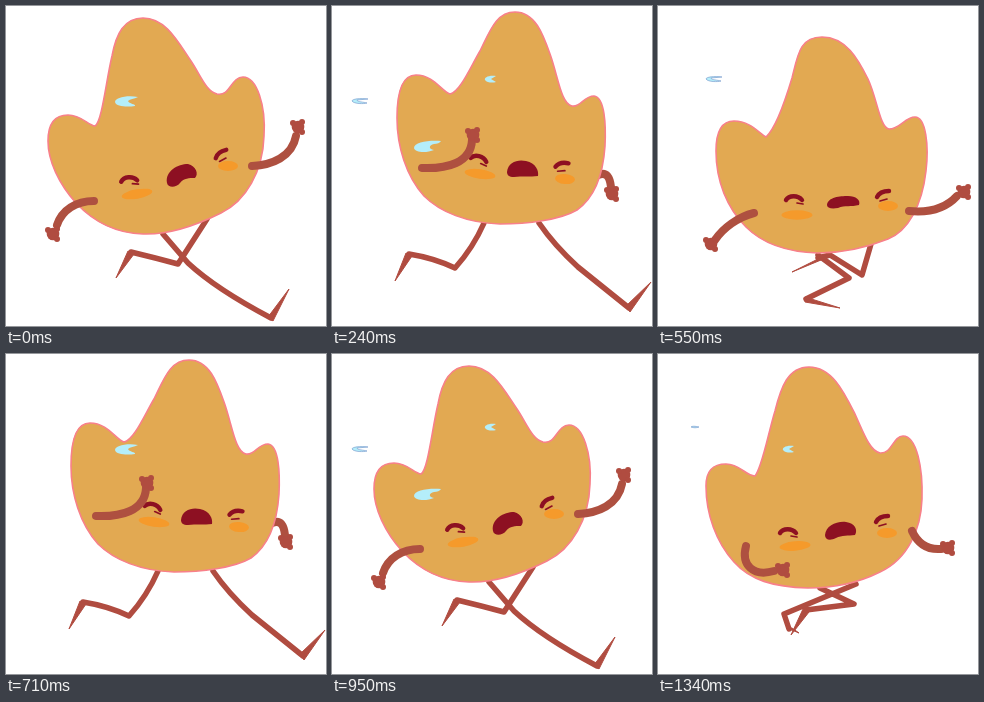
Animation of 320 by 320 pixels, one loop 1420 ms. Source, as an HTML page without scripts:

```html
<!DOCTYPE html>
<html lang="en">
<head>
<meta charset="utf-8">
<title>Running leaf</title>
<style>
html, body { margin: 0; width: 100%; height: 100%; overflow: hidden; background: #fff; }
svg { display: block; width: 100vw; height: 100vh; overflow: hidden; }
.body { fill: #e2a952; stroke: #f8808a; stroke-width: 1.6; }
.arm, .leg { fill: none; stroke: #b04c40; stroke-linecap: round; stroke-linejoin: round; }
.arm { stroke: #ae5040; stroke-width: 8; }
.leg { stroke-width: 5.5; }
.foot { fill: #b04c40; stroke: #b04c40; stroke-linejoin: round; }
.hand { fill: #b04c40; }
.mouth { fill: #8d1022; }
.eye { fill: none; stroke: #8d1022; stroke-width: 4.4; stroke-linecap: round; }
.crease { stroke-width: 1.7; }
.blush { fill: #f59a2b; }
.drop { fill: #b4eefa; }
.faint { stroke: #7f9fd0; stroke-width: .7; }

/* Both strips hold one 320px cell per pose and jump from cell to cell. */
.run, .sweat { animation: run 1420ms step-end infinite; }
.sweat { animation-name: sweat; }
@keyframes run {
  0%, 33.8%, 66.9% { transform: translateX(0); }
  5.63%, 38.73%, 72.53% { transform: translateX(-320px); }
  11.26%, 44.36%, 78.16% { transform: translateX(-640px); }
  16.9%, 50%, 83.09% { transform: translateX(-960px); }
  22.53%, 55.63%, 88.73% { transform: translateX(-1280px); }
  28.16%, 61.26%, 94.36% { transform: translateX(-1600px); }
}
@keyframes sweat {
  0%, 50% { transform: translateX(0); }
  5.63%, 55.63% { transform: translateX(-320px); }
  11.26%, 61.26% { transform: translateX(-640px); }
  16.9%, 66.9% { transform: translateX(-960px); }
  22.53%, 72.53% { transform: translateX(-1280px); }
  28.16%, 78.16% { transform: translateX(-1600px); }
  33.8%, 83.09% { transform: translateX(-1920px); }
  38.73%, 88.73% { transform: translateX(-2240px); }
  44.36%, 94.36% { transform: translateX(-2560px); }
}
</style>
</head>
<body>
<svg viewBox="0 0 320 320" xmlns="http://www.w3.org/2000/svg">
  <defs>
    <g id="hand" class="hand">
      <circle r="6.3"/><circle cx="-5" cy="-4" r="3"/><circle cx="4" cy="-5" r="3"/><circle cx="4" cy="5" r="3"/>
    </g>
    <g id="eye-l" class="eye">
      <path d="M-8 2C-5-3 4-3 8 2"/><path class="crease" d="M3 5l6 1"/>
    </g>
    <g id="eye-r" class="eye">
      <path d="M-6 3C-4-1 1-3 6-3"/><path class="crease" d="M-3 7l7-2"/>
    </g>
    <ellipse id="blush-l" class="blush" rx="15.5" ry="4.7"/>
    <ellipse id="blush-r" class="blush" rx="10" ry="5"/>
    <!-- Six stages of one flying drop, one per cell -->
    <g id="drop" class="drop">
      <path d="M6-3C-2-4-6-1-5 1C-3 4 3 4 6 3L1 0Z"/>
      <path transform="translate(310)" d="M12-4C0-6-11-3-11 1C-10 6 2 6 9 5C10 3 3 3 2 0C4-2 8-2 12-4Z"/>
      <path transform="translate(606)" d="M14-5C2-6-13-4-13 2C-12 7 0 7 7 4C1 3 2-1 7-2C10-2 13-3 14-5Z"/>
      <path transform="translate(892)" d="M20-4C5-6-20-6-21 1C-20 6 0 6 7 2C6-1-4 2-4-1C2-3 12-2 20-4Z"/>
      <path class="faint" transform="translate(1178)" d="M8-2C0-3-8-2-8 0C-6 3 4 3 7 2C4 1-3 1-3-1Z"/>
      <path class="faint" transform="translate(1479)" d="M4 0C0-1-3-1-4 0C-1 1 1 1 4 0Z"/>
    </g>
  </defs>

  <g class="run">
    <g>
      <path class="leg" d="M201 213L172 258Q150 252 125 246M157 228L182 257Q210 283 265 312"/>
      <path class="foot" d="M122 245L110 272L128 248ZM262 311L283 283L267 315Z"/>
      <path class="body" d="M137 12C160 12 172 36 185 55C195 70 200 85 211 88C224 91 225 71 237 71C251 71 260 100 258 130C257 165 240 195 215 207C195 217 165 229 137 228C105 227 85 213 70 197C53 178 42 155 42 135C42 118 48 109 62 109C75 109 82 119 89 120C96 116 100 75 106 50C110 28 118 12 137 12Z"/>
      <use href="#blush-l" transform="translate(131 188) rotate(-10)"/>
      <use href="#blush-r" transform="translate(222 160)"/>
      <use href="#eye-l" transform="translate(123 173) rotate(-5)"/>
      <use href="#eye-r" transform="translate(215 148) rotate(-12)"/>
      <path class="mouth" d="M161 177C159 165 172 158 182 158C190 160 193 168 189 172C183 172 178 172 174 177C170 182 162 182 161 177Z"/>
      <path class="arm" d="M88 195C70 195 56 204 51 219M246 160C266 159 286 151 290 130"/>
      <use href="#hand" x="47" y="228"/><use href="#hand" x="292" y="121"/>
    </g>

    <g transform="translate(320)">
      <path class="leg" d="M213 238L204 269L172 249L160 252M160 249L191 272L148 293"/>
      <path class="foot" d="M172 247L134 266L163 254ZM147 291L182 302L147 296Z"/>
      <path class="body" d="M164 31C188 31 200 53 210 73C219 92 222 122 231 123C242 123 247 111 257 111C268 111 271 140 268 165C264 200 250 225 230 233C205 243 180 247 160 247C125 246 103 236 88 221C69 202 58 175 58 145C58 125 64 115 76 115C92 115 101 127 108 131C118 122 128 92 134 72C140 48 142 31 164 31Z"/>
      <use href="#blush-l" transform="translate(139 209)"/>
      <use href="#blush-r" transform="translate(230 200)"/>
      <use href="#eye-l" transform="translate(136 192)"/>
      <use href="#eye-r" transform="translate(225 188)"/>
      <path class="mouth" d="M169 199C170 191 182 190 190 190C198 190 203 194 201 199C193 201 187 199 180 202C173 203 169 202 169 199Z"/>
      <path class="arm" d="M96 207C80 211 65 222 57 234M251 205C271 207 288 202 299 190"/>
      <use href="#hand" x="53" y="238"/><use href="#hand" x="306" y="186"/>
    </g>

    <g transform="translate(640)">
      <path class="leg" d="M156 226L137 254L118 263M208 226L232 246L184 254"/>
      <path class="foot" d="M116 261L128 279L121 264ZM182 252L172 277L187 255Z"/>
      <path class="body" d="M176 13C198 13 207 36 215 57C223 78 227 105 237 107C246 108 250 97 260 97C271 98 273 127 271 149C269 180 258 204 240 214C220 224 190 228 165 228C132 227 106 216 91 201C72 181 62 152 62 124C62 98 68 84 81 84C98 84 107 99 115 102C125 98 134 72 143 54C152 32 156 13 176 13Z"/>
      <use href="#blush-l" transform="translate(145 183) rotate(5)"/>
      <use href="#blush-r" transform="translate(232 183)"/>
      <use href="#eye-l" transform="translate(143 166) rotate(8)"/>
      <use href="#eye-r" transform="translate(229 170) rotate(5)"/>
      <path class="mouth" d="M173 177C174 168 184 165 193 167C202 168 206 175 204 181C196 182 189 180 182 182C176 183 173 181 173 177Z"/>
      <path class="arm" d="M90 180C88 198 102 206 120 199M262 180C268 191 276 196 287 196"/>
      <use href="#hand" x="127" y="196"/><use href="#hand" x="294" y="195"/>
    </g>

    <g transform="translate(960)">
      <path class="leg" d="M152 217Q141 242 123 262Q102 252 77 248M207 217Q222 239 246 261L297 302"/>
      <path class="foot" d="M74 247L63 275L80 250ZM294 300L319 276L298 306Z"/>
      <path class="arm" d="M266 169C275 165 278 172 279 181"/>
      <use href="#hand" x="280" y="188"/>
      <path class="body" d="M183 6C203 6 211 28 218 48C226 70 229 98 240 100C248 102 252 90 262 90C273 91 274 120 273 140C271 170 262 192 245 204C228 214 195 218 168 218C135 217 108 206 92 190C74 170 65 140 65 112C65 85 70 69 84 69C102 69 110 86 118 88C128 86 138 62 148 45C158 25 164 6 183 6Z"/>
      <use href="#blush-l" transform="translate(148 168) rotate(8)"/>
      <use href="#blush-r" transform="translate(233 173) rotate(5)"/>
      <use href="#eye-l" transform="translate(147 152) rotate(14)"/>
      <use href="#eye-r" transform="translate(230 159) rotate(12)"/>
      <path class="mouth" d="M175 166C176 156 186 153 194 155C204 157 207 165 206 170C198 171 190 170 182 171C177 171 175 169 175 166Z"/>
      <path class="arm" d="M90 162C115 163 139 157 140 134"/>
      <use href="#hand" x="141" y="129"/>
    </g>

    <g transform="translate(1280)">
      <path class="leg" d="M157 248L151 279Q132 264 108 255M207 240L234 265L185 285"/>
      <path class="foot" d="M107 252L83 272L110 258ZM184 283L221 293L183 288Z"/>
      <path class="arm" d="M265 185C275 178 284 177 290 184"/>
      <use href="#hand" x="291" y="185"/>
      <path class="body" d="M175 32C197 32 205 55 213 74C221 94 223 122 232 124C241 124 247 111 257 111C268 111 271 140 268 165C264 200 250 225 230 233C205 243 180 247 160 247C125 246 103 236 88 221C69 202 58 175 58 145C58 125 64 115 76 115C92 115 101 127 108 130C122 122 132 92 144 70C152 50 158 32 175 32Z"/>
      <use href="#blush-l" transform="translate(140 209)"/>
      <use href="#blush-r" transform="translate(230 200)"/>
      <use href="#eye-l" transform="translate(135 191)"/>
      <use href="#eye-r" transform="translate(225 188)"/>
      <path class="mouth" d="M171 195C173 188 182 187 190 189C198 190 203 195 201 199C195 201 188 198 180 200C174 201 171 199 171 195Z"/>
      <path class="arm" d="M91 207C110 210 132 206 146 195"/>
      <use href="#hand" x="150" y="190"/>
    </g>

    <g transform="translate(1600)">
      <path class="leg" d="M198 230L126 260L131 275M162 234L196 250L148 256"/>
      <path class="foot" d="M129 274L141 279L134 274ZM145 255L133 281L151 258Z"/>
      <path class="body" d="M151 13C174 13 186 38 197 60C206 80 212 97 222 99C234 100 235 82 245 82C259 82 265 115 264 145C263 175 250 205 222 218C200 229 175 234 150 234C115 233 92 226 76 208C58 188 48 160 48 132C48 117 54 110 68 110C82 110 88 122 97 122C104 114 110 80 117 57C123 33 130 13 151 13Z"/>
      <use href="#blush-l" transform="translate(137 192) rotate(-5)"/>
      <use href="#blush-r" transform="translate(229 179)"/>
      <use href="#eye-l" transform="translate(130 177)"/>
      <use href="#eye-r" transform="translate(224 165)"/>
      <path class="mouth" d="M167 181C168 172 178 167 188 168C197 169 200 176 197 181C190 182 184 181 178 184C172 187 167 186 167 181Z"/>
      <path class="arm" d="M88 192C83 211 95 223 116 217M254 177C260 190 270 196 283 195"/>
      <use href="#hand" x="125" y="216"/><use href="#hand" x="290" y="194"/>
    </g>
  </g>

  <g class="sweat">
    <use href="#drop" x="-190" y="95"/>
    <use href="#drop" x="449" y="140"/>
    <use href="#drop" x="1118" y="73"/>
    <use href="#drop" x="2690" y="95"/>
  </g>
</svg>
</body>
</html>
```
